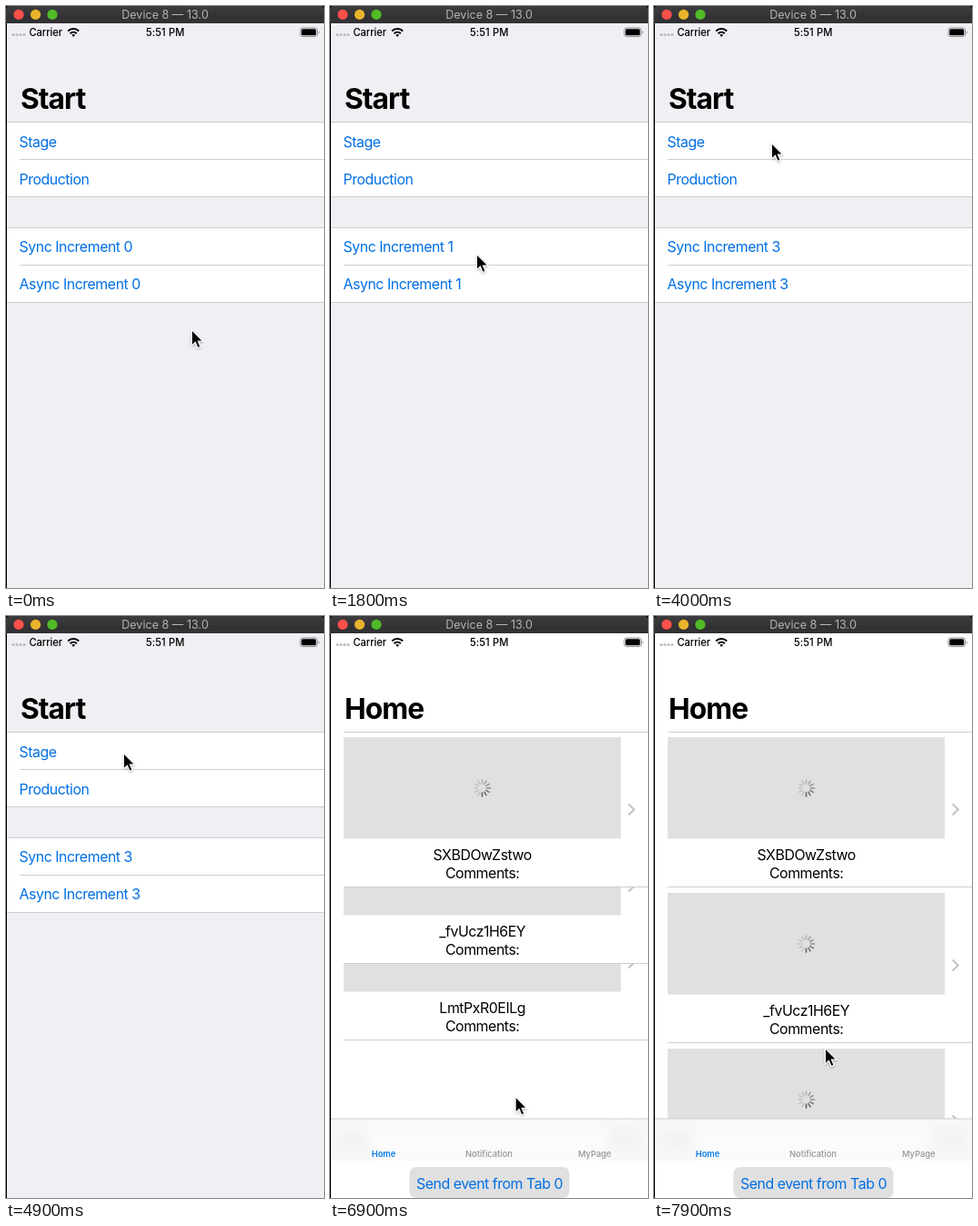
Animation of 350x639 px, one loop 8000 ms. Source, as an HTML page:

```html
<!DOCTYPE html>
<html lang="en">
<head>
<meta charset="utf-8">
<title>Increment demo</title>
<style>
  html, body { margin: 0; width: 100%; height: 100%; overflow: hidden; background: #000; }
  svg { display: block; font-family: Inter, Roboto, sans-serif; }
  .h1 { font-size: 31.7px; font-weight: 700; letter-spacing: -.95px; }
  .body { font-size: 15.9px; letter-spacing: -.46px; }
  .link { fill: #006fe4; }
  .small { font-size: 11.2px; font-weight: 500; letter-spacing: -.1px; }
  .clock { letter-spacing: .1px; }
  .tab { font-size: 9.4px; font-weight: 500; fill: #949494; }
  .mid { text-anchor: middle; }
  .bar { font-size: 12.6px; fill: #b4b3b5; }
  .rule { fill: #cecdd2; }
</style>
</head>
<body>
<svg width="350" height="639" viewBox="0 0 350 639">
  <defs>
    <linearGradient id="chrome" x2="0" y2="1">
      <stop stop-color="#3c3b3e"/><stop offset="1" stop-color="#2f2e31"/>
    </linearGradient>
    <filter id="soft" x="-50%" y="-50%" width="200%" height="200%"><feGaussianBlur stdDeviation="6"/></filter>
    <filter id="shade" x="-50%" y="-50%" width="200%" height="200%">
      <feDropShadow dx="0" dy="1" stdDeviation="1" flood-opacity=".35"/>
    </filter>
    <clipPath id="tabClip"><rect x="1" y="552" width="349" height="46"/></clipPath>
  </defs>
  <g id="start"></g>
  <g id="home"></g>
  <g id="frame"></g>
  <path id="cursor" d="M.4 .6V17.8L4.4 14.1L7.1 20.5L10.1 19.2L7.4 13H12.8Z" stroke="#fff" stroke-width="1.1" filter="url(#shade)"/>
</svg>
<script>
const LOOP = 8000, STEP = 100;
const $ = id => document.getElementById(id);
const rect = (x, y, w, h, fill, extra = '') =>
  `<rect x="${x}" y="${y}" width="${w}" height="${h}" fill="${fill}" ${extra}/>`;
const text = (x, y, cls, s, extra = '') => `<text x="${x}" y="${y}" class="${cls}" ${extra}>${s}</text>`;
const rule = (y, x = 1) => `<rect class="rule" x="${x}" y="${y}" width="${350 - x}" height="1"/>`;
const dots = (xs, y, r, fills) =>
  xs.map((x, i) => `<circle cx="${x}" cy="${y}" r="${r}" fill="${fills[i % fills.length]}"/>`).join('');

// Window chrome and status bar
$('frame').innerHTML =
  rect(0, 19, 1, 620, '#000') +
  rect(0, 0, 350, 19, '#000') + rect(0, 0, 350, 19, 'url(#chrome)', 'rx="4"') + rect(0, 10, 350, 9, '#323134') +
  dots([14, 32.6, 51], 9.4, 5.6, ['#fc504a', '#e9b32b', '#50bb27']) +
  text(175, 14, 'bar mid', 'Device 8 — 13.0') +
  dots([8, 12, 16, 20], 31.5, 1.6, ['#bdbcc1']) +
  text(25.5, 33, 'small', 'Carrier') +
  text(175.2, 33, 'small clock mid', '5:51 PM') +
  `<g fill="none" stroke="#000" stroke-width="2">
    <path d="M68.2 27.5a8.6 8.6 0 0 1 12 0M70.6 30.2a5.1 5.1 0 0 1 7.2 0"/>
  </g><path d="M72.3 31.8a2.8 2.8 0 0 1 3.8 0L74.2 34Z"/>` +
  rect(323.9, 24, 18.6, 9.6, 'none', 'rx="2.6" stroke="#8d8d90"') +
  rect(325.2, 25.3, 16, 7, '#000', 'rx="1.5"') +
  '<path d="M343.8 27.2a2 2 0 0 1 0 3.4Z" fill="#8d8d90"/>';

// Start screen
const rows = { stage: 128, production: 169, sync: 243.4, async: 284.4 };
const labels = { stage: 'Stage', production: 'Production' };
$('start').innerHTML =
  rect(1, 19, 349, 620, '#efeff4') + text(16, 112.7, 'h1', 'Start') +
  rect(1, 128, 349, 82, '#fff') + rect(1, 244, 349, 81, '#fff') +
  [127, 209, 243, 325].map(y => rule(y)).join('') + rule(168, 15) + rule(284, 15) +
  rect(1, 0, 349, 41.5, '#cac9ce', 'id="press"') +
  Object.entries(rows).map(([id, y]) =>
    text(14.5, y + 26.6, 'body link', labels[id] || '', `id="${id}"`)).join('');

// Home screen
const ROW = 171, SHORT = 84, TOP = 127;
const spokes = Array.from({ length: 12 }, (_, i) =>
  `<path class="spoke" d="M0 -5V-8.9" transform="rotate(${i * 30})"/>`).join('');
const card = (name, i) => `
  <svg class="card" x="0" width="350" height="${ROW}" overflow="hidden"><g>
    ${rect(15, 6, 305, 111.5, '#e0e0e0')}
    <g transform="translate(167.5 62)" stroke="#555" stroke-width="1.7" stroke-linecap="round">${spokes}</g>
    ${text(167.7, 141, 'body mid', name)}${text(167.7, 161.3, 'body mid', 'Comments:')}
    <path d="M328.5 79.5l6.3 6-6.3 6" fill="none" stroke="#c3c3c6" stroke-width="2"/>
    ${rule(ROW - 1, 15)}
  </g></svg>`;
const blanks = Array.from({ length: 10 }, (_, i) => rule(168 + i * 40.95, 15)).join('');
$('home').innerHTML =
  rect(1, 19, 349, 620, '#fff') + text(16, 112.7, 'h1', 'Home') +
  `<g id="blank">${blanks}</g><g id="list">${rule(TOP, 15)}` +
  ['SXBDOwZstwo', '_fvUcz1H6EY', 'LmtPxR0EILg'].map(card).join('') + '</g>' +
  rect(1, 552, 349, 87, '#fff') + rect(1, 552, 349, 46, '#f8f8f8') +
  `<g clip-path="url(#tabClip)"><g filter="url(#soft)">${
    rect(8, 566, 34, 20, '#f3f3f3') + rect(308, 562, 34, 26, '#f3f3f3') + rect(46, 566, 256, 26, '#fbfbfb')}</g></g>` +
  rule(551.5) +
  text(59, 594, 'tab mid', 'Home', 'style="fill:#0879e8;font-weight:600"') +
  text(175, 594, 'tab mid', 'Notification') + text(291.3, 594, 'tab mid', 'MyPage') +
  rect(87.5, 605, 176, 34, '#e0e0e0', 'rx="7"') +
  text(175.5, 628.5, 'body link mid', 'Send event from Tab 0');

const cards = [...document.querySelectorAll('.card')];
const spokeEls = [...document.querySelectorAll('.spoke')];

// Pointer stops: time, x, y
const path = [
  [0, 204, 355], [200, 204, 355], [900, 161, 270], [1900, 161, 272], [2400, 167, 303],
  [2800, 167, 303], [3200, 221, 292], [3600, 187, 240], [4000, 129, 150], [4900, 129, 150],
  [5400, 203, 461], [5900, 203, 455], [6500, 203, 457], [7100, 204, 552], [7300, 204, 552],
  [7900, 188, 474]
];
const presses = [
  [1100, 1200, 'sync'], [2000, 2100, 'sync'], [2500, 2700, 'async'], [4700, 4900, 'stage']
];
const counts = [1200, 2100, 3700];
const OPEN = 5500, LOADED = 6900, GROW = 7200, GROWN = 7500;

const ease = p => p * p * (3 - 2 * p);
const clamp = p => Math.max(0, Math.min(1, p));
const show = (id, on) => { $(id).style.display = on ? '' : 'none'; };

function pointer(t) {
  const i = Math.max(1, path.findIndex(k => k[0] >= t));
  const [a, b] = [path[i - 1], path[i]];
  const p = ease(clamp((t - a[0]) / (b[0] - a[0])));
  return [1, 2].map(n => a[n] + (b[n] - a[n]) * p);
}

function draw(t) {
  $('cursor').setAttribute('transform', `translate(${pointer(t)})`);
  show('start', t < OPEN);
  show('home', t >= OPEN);

  const n = counts.filter(c => t >= c).length;
  $('sync').textContent = 'Sync Increment ' + n;
  $('async').textContent = 'Async Increment ' + n;
  const hit = presses.find(([from, to]) => t >= from && t < to);
  show('press', hit);
  if (hit) $('press').setAttribute('y', Math.floor(rows[hit[2]]));

  show('blank', t < LOADED);
  show('list', t >= LOADED);
  const h = SHORT + (ROW - SHORT) * ease(clamp((t - GROW) / (GROWN - GROW)));
  let y = TOP;
  cards.forEach((el, i) => {
    const height = i ? h : ROW;
    el.setAttribute('y', y);
    el.setAttribute('height', height);
    el.firstElementChild.setAttribute('transform', `translate(0 ${height - ROW})`);
    y += height;
  });

  // One turn per second, leading spoke darkest
  const head = 9 + Math.floor((t - 7100) / 1000 * 12);
  spokeEls.forEach((el, i) => {
    const lag = (((head - i) % 12) + 12) % 12;
    el.setAttribute('opacity', Math.max(.2, .85 - lag * .09));
  });
}

const begin = performance.now();
function tick() {
  const t = (performance.now() - begin) % LOOP;
  draw(Math.floor(t / STEP) * STEP);
  requestAnimationFrame(tick);
}
tick();
</script>
</body>
</html>
```
